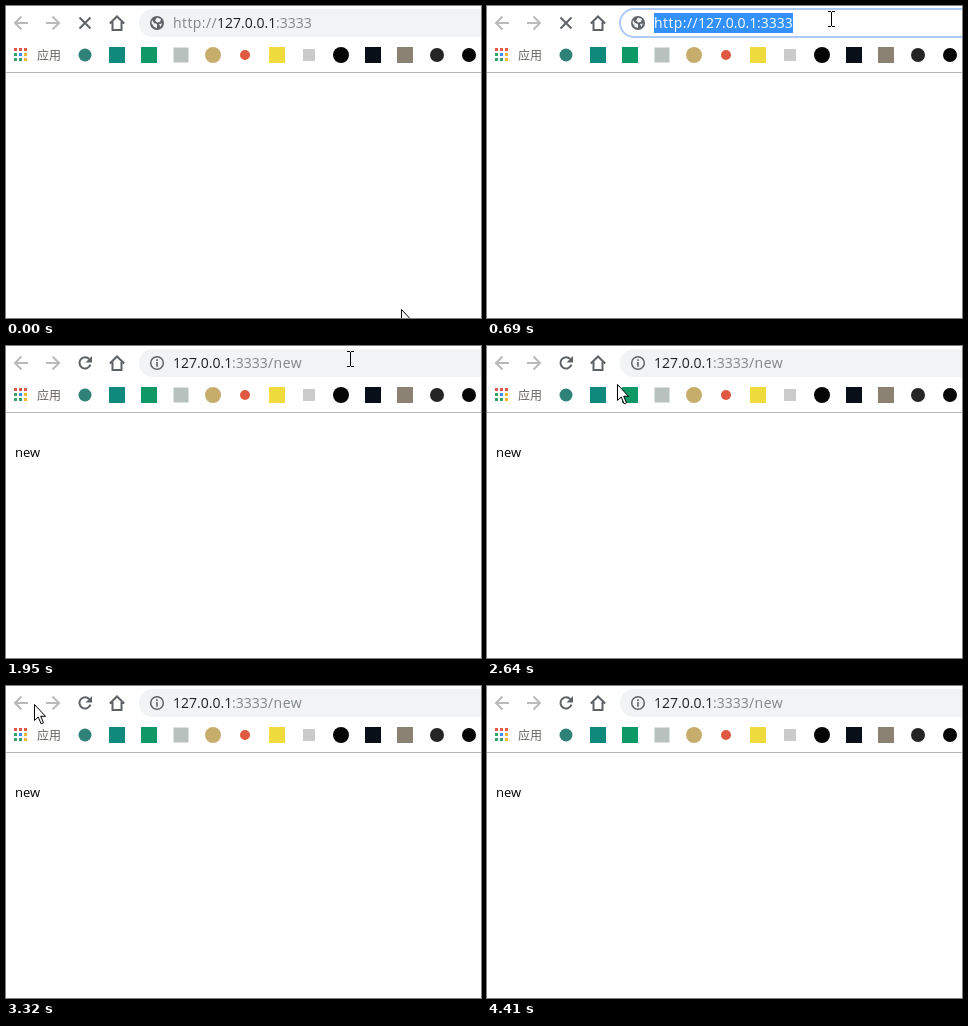
These frames come from a looping animation (475x312 px, 4.94 s). An HTML page:

```html
<!DOCTYPE html>
<html lang="zh">
<head>
<meta charset="utf-8">
<title>Browser redirect</title>
<style>
  html, body { margin: 0; width: 100%; height: 100%; overflow: hidden; background: #fff; }
  svg { display: block; width: 475px; height: 312px; }
  text { font: 14px "Open Sans", "Noto Sans", sans-serif; white-space: pre; }
  .loose { letter-spacing: .45px; }
  .muted { fill: #80868b; }
  .host { fill: #202124; }
  .selected text { fill: #fff; }
  .icon { fill: none; stroke: #5f6368; stroke-width: 2; }
  .off { stroke: #bababa; }
  .hidden { display: none; }
</style>
</head>
<body>
<svg viewBox="0 0 475 312">
  <path class="icon off" d="M22 17H9.5M15.5 10.5L9 17l6.5 6.5"/>
  <path class="icon off" d="M40 17H52.5M46.5 10.5L53 17l-6.5 6.5"/>
  <path id="stop" class="icon" d="M73.5 11.5l11 11M84.500 11.5l-11 11"/>
  <g id="reload">
    <path class="icon" d="M83.300 13.200A5.600 5.600 0 1 0 84.400 18.600"/>
    <path d="M86 10v6.500h-6.500z" fill="#5f6368"/>
  </g>
  <path class="icon" d="M103.800 17.500L111 10.500l7.200 7M106.500 16v8h9v-8"/>

  <rect id="bar" x="133" y="3" width="400" height="28" rx="14" fill="#f1f3f4"/>
  <g id="globe">
    <circle cx="151" cy="17" r="7" fill="#5f6368"/>
    <path d="M146 14l2 3 3 1v4l-3-1-2.500-4zM151 11.500l4 1.500-1 3-3 .5-2-2zM153 18l3-.5-1.500 3.500z" fill="#f1f3f4"/>
  </g>
  <g id="info">
    <circle class="icon" cx="151" cy="17" r="6.300" style="stroke-width:1.500"/>
    <path d="M150.200 13.300h1.600v1.600h-1.600zM150.200 16h1.600v4.700h-1.600z" fill="#5f6368"/>
  </g>
  <rect id="selection" x="167" y="7" width="139" height="20" fill="#3390ff"/>
  <g id="url">
    <text id="scheme" class="muted loose" x="167" y="22">http://</text>
    <g id="address">
      <text class="host" x="167" y="22">127.0.0.1</text>
      <text class="muted" x="226" y="22">:3333</text>
      <text id="route" class="muted loose" x="262" y="22">/new</text>
    </g>
  </g>

  <g id="apps"></g>
  <text x="31" y="53.500" fill="#66635f" style="font:12px 'Noto Sans CJK SC','Noto Sans CJK',sans-serif">应用</text>
  <g id="bookmarks"></g>
  <path d="M0 66.500H475" stroke="#b5b5b5"/>
  <text id="content" x="9" y="111" style="font-size:13px">new</text>

  <circle id="click" r="12" fill="#ffff78" style="mix-blend-mode:multiply"/>
  <path id="arrow" d="M.5.5V16.500L4.200 13l2.900 6.800 2.400-1-2.800-6.500H11.500z" fill="#fff" stroke="#000"/>
  <path id="beam" d="M-3 -7.500H0M1 -7.500H4M.5 -7V7M-3 7.500H0M1 7.500H4" fill="none" stroke="#000"/>
</svg>
<script>
const LOOP = 4940, STEP = 78;
const $ = id => document.getElementById(id);

function add(parent, tag, attrs) {
  const node = document.createElementNS(parent.namespaceURI, tag);
  for (const key in attrs) node.setAttribute(key, attrs[key]);
  parent.append(node);
}

const [R, G, B, Y] = ['#e0574a', '#35a365', '#4285f4', '#f2b632'];
[R, R, R, G, B, Y, G, G, Y].forEach((fill, i) => add($('apps'), 'rect', {
  x: 8 + i % 3 * 5, y: 42 + Math.floor(i / 3) * 5, width: 3, height: 3, fill
}));

// Bookmark icons: shape, half size, colour
[
  ['circle', 6.5, '#2f8278'], ['rect', 8, '#0f897b'], ['rect', 8, '#0d9866'],
  ['rect', 7.5, '#b9c1be'], ['circle', 8, '#c6ad6c'], ['circle', 5, '#df5840'],
  ['rect', 8, '#f0db3e'], ['rect', 6, '#cbcbcb'], ['circle', 8, '#050505'],
  ['rect', 8, '#080f18'], ['rect', 8, '#8b8273'], ['circle', 7, '#252525'],
  ['circle', 7, '#050505']
].forEach(([shape, r, fill], i) => {
  const x = 79 + i * 32, y = 49;
  add($('bookmarks'), shape, shape === 'circle'
    ? { cx: x, cy: y, r, fill }
    : { x: x - r, y: y - r, width: 2 * r, height: 2 * r, fill });
});

// Pointer moves: start time, number of steps, end point, optional bend
const moves = [
  { at: 70, steps: 7, to: [344, 13] },
  { at: 2400, steps: 7, to: [14, 20], bend: [150, 60] },
  { at: 3090, steps: 5, to: [36, 17] },
  { at: 3550, steps: 2, to: [40, 16] },
  { at: 3860, steps: 6, to: [389, 291] },
  { at: 4340, steps: 1, to: [393, 295] }
];

function pointer(t) {
  let pos = [395, 303];
  for (const { at, steps, to, bend } of moves) {
    if (t < at) break;
    const p = Math.min(1, (Math.floor((t - at) / STEP) + 1) / steps);
    const e = p * p * (3 - 2 * p);
    pos = pos.map((from, i) => {
      const mid = bend ? bend[i] : (from + to[i]) / 2;
      return Math.round((1 - e) ** 2 * from + 2 * e * (1 - e) * mid + e * e * to[i]);
    });
  }
  return pos;
}

const show = (id, on) => $(id).classList.toggle('hidden', !on);
const within = (t, from, to) => t >= from && t < to;

function draw(t) {
  const typed = t >= 1470, loaded = t >= 1870, reloadable = t >= 1950;
  const focus = within(t, 620, 1470);
  const [x, y] = pointer(t), place = `translate(${x} ${y})`;
  const overField = x > 165 && y >= 3 && y <= 31, visible = t < 4410;

  $('bar').setAttribute('fill', focus ? '#fff' : '#f1f3f4');
  $('bar').setAttribute('stroke', focus ? '#accafa' : 'none');
  $('bar').setAttribute('stroke-width', 2);
  $('url').classList.toggle('selected', focus);
  $('address').setAttribute('transform', `translate(${typed ? 0 : 44} 0)`);
  show('selection', focus);
  show('scheme', !typed);
  show('globe', !typed);
  show('info', typed);
  show('route', loaded);
  show('content', loaded);
  show('stop', !reloadable);
  show('reload', reloadable);

  for (const id of ['click', 'arrow', 'beam']) $(id).setAttribute('transform', place);
  show('click', [620, 2940, 3780].some(at => within(t, at, at + STEP - 8)));
  show('arrow', visible && !overField);
  show('beam', visible && overField);
}

const start = performance.now();
function tick() {
  draw((performance.now() - start) % LOOP);
  requestAnimationFrame(tick);
}
draw(0);
requestAnimationFrame(tick);
</script>
</body>
</html>
```
